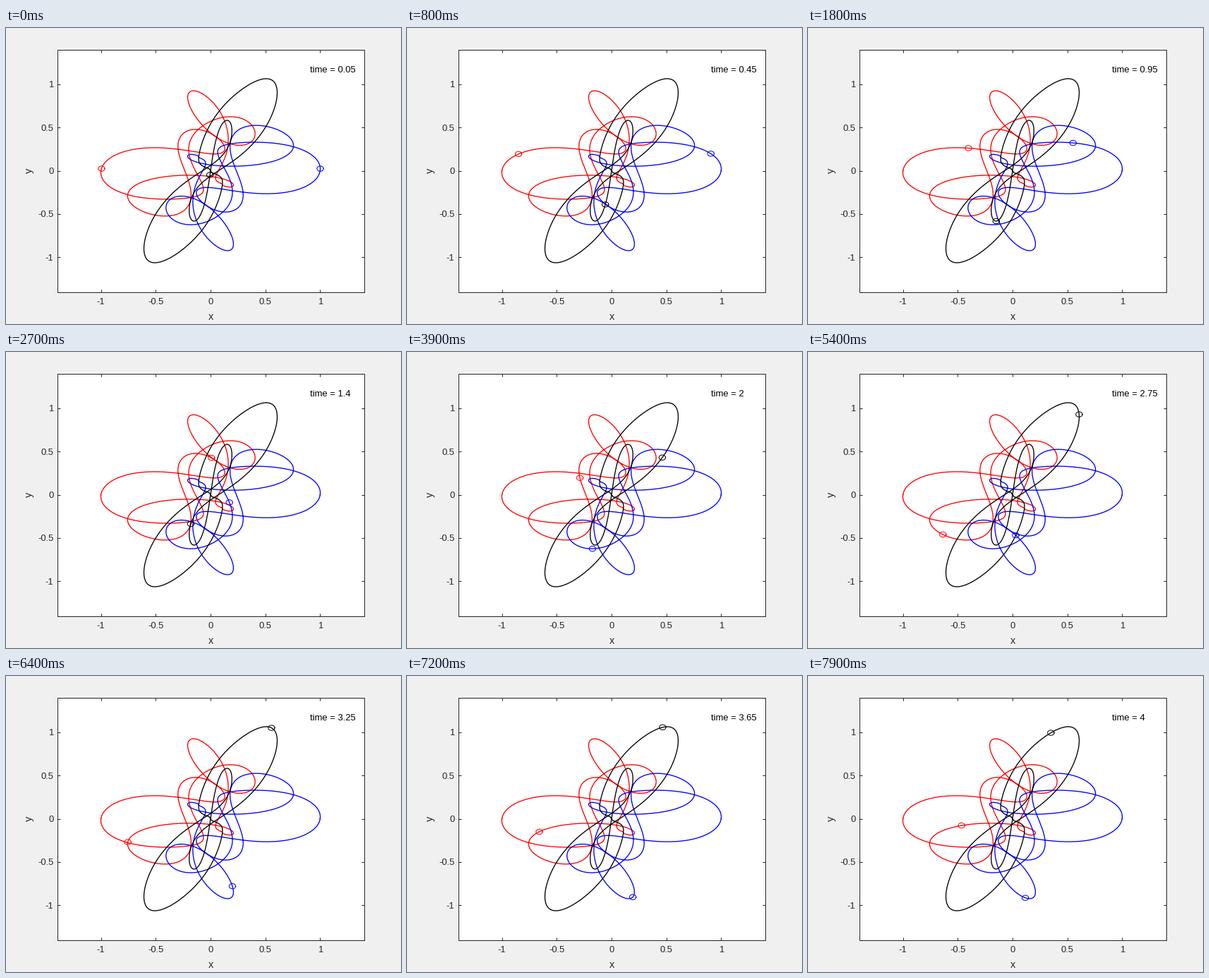
Animation of 560x420 px, one loop 8000 ms. Source, as a matplotlib script:

```python
import numpy as np
import matplotlib.pyplot as plt
from matplotlib.animation import FuncAnimation

W, H, DPI = 560, 420, 100
PX = 72 / DPI                       # one pixel in points
FRAMES, DT = 80, 0.05
COLORS = ["red", "blue", "black"]
INK = "#262626"
RADIUS = 0.03

# Sightings of the red and the black body that pick out this orbit.
TIMES = np.array([0.45, 1.4, 2, 2.75, 3.25, 4])
SEEN = np.array([
    [-0.847 + 0.191j, -0.058 - 0.386j],
    [0.026 + 0.423j, -0.187 - 0.330j],
    [-0.267 + 0.188j, 0.480 + 0.423j],
    [-0.638 - 0.464j, 0.625 + 0.919j],
    [-0.747 - 0.264j, 0.570 + 1.042j],
    [-0.435 - 0.077j, 0.361 + 0.993j],
])


def accel(p):
    """Gravity among three unit masses; positions are complex, shape (3, n)."""
    side = p[[1, 2, 0]] - p
    pull = side / np.abs(side) ** 3
    return pull - pull[[2, 0, 1]]


def fly(v, span, steps):
    """Integrate from (-1, 1, 0) with velocities (v, v, -2v), many v at once."""
    v = np.atleast_1d(v)
    one = np.ones_like(v)
    p, q = np.array([-one, one, 0 * one]), np.array([v, v, -2 * v])
    dt = span / steps
    ps, qs = [p], [q]
    for _ in range(steps):
        k1 = accel(p)
        k2 = accel(p + dt / 2 * q + dt ** 2 / 8 * k1)
        k3 = accel(p + dt * q + dt ** 2 / 2 * k2)
        p = p + dt * q + dt ** 2 / 6 * (k1 + 2 * k2)
        q = q + dt / 6 * (k1 + 4 * k2 + k3)
        ps.append(p)
        qs.append(q)
    return np.array(ps), np.array(qs)


def split(z):
    z = z.reshape(-1, z.shape[-1])
    return np.vstack([z.real, z.imag])


def misfit(u):
    p, _ = fly(u[0] + 1j * u[1], 4.0, 800)
    look = np.rint(TIMES * 200).astype(int)
    return split(p[look][:, ::2] - SEEN[..., None])


def gap(u):
    """Half a period on, black is back at the centre and red and blue move alike."""
    p, q = fly(u[0] + 1j * u[1], u[2], 1500)
    return split(np.array([p[-1, 2], 0.3 * (q[-1, 0] - q[-1, 1])]))


def refine(resid, u, rounds, eps=1e-6):
    """Gauss-Newton with a line search."""
    scales = 0.5 ** np.arange(8)
    for _ in range(rounds):
        r = resid(u[:, None] + eps * np.c_[np.zeros(len(u)), np.eye(len(u))])
        jac = (r[:, 1:] - r[:, :1]) / eps
        step = np.linalg.lstsq(jac, -r[:, 0], rcond=None)[0]
        tries = u[:, None] + step[:, None] * scales
        errs = np.linalg.norm(resid(tries), axis=0)
        best = np.nanargmin(errs)
        if not errs[best] < np.linalg.norm(r[:, 0]):
            break
        u = tries[:, best]
        if errs[best] < 1e-9:
            break
    return u


def solve():
    vx, vy = np.meshgrid(np.linspace(0.04, 0.09, 21), np.linspace(0.44, 0.50, 21))
    grid = np.array([vx.ravel(), vy.ravel()])
    start = grid[:, np.nanargmin(np.linalg.norm(misfit(grid), axis=0))]
    vel = refine(misfit, start, 8)

    p, q = fly(vel[0] + 1j * vel[1], 6.2, 3100)
    miss = np.abs(p[:, 2, 0]) + 0.2 * np.abs(q[:, 0, 0] - q[:, 1, 0])
    half = (2200 + np.argmin(miss[2200:])) / 500
    return refine(gap, np.append(vel, half), 10)


vx, vy, half = solve()
path = fly(vx + 1j * vy, half, 2000)[0][:, :, 0]
clock = np.linspace(0, half, len(path))

# The second half mirrors the first, with red and blue swapped.
loops = np.vstack([path, -path[::-1][:, [1, 0, 2]]])

plt.rcParams["font.family"] = "Liberation Sans"
fig = plt.figure(figsize=(W / DPI, H / DPI), dpi=DPI, facecolor="#f0f0f0")
ax = fig.add_axes([72.5 / W, 45.5 / H, 435 / W, 344 / H], facecolor="white")
ax.set(xlim=(-1.4, 1.4), ylim=(-1.4, 1.4))
ticks = [-1, -0.5, 0, 0.5, 1]
names = [f"{t:g}" for t in ticks]
ax.set_xticks(ticks, names)
ax.set_yticks(ticks, names)
ax.tick_params(direction="in", top=True, right=True, length=4.4 * PX,
               width=PX, color=INK, labelcolor=INK, labelsize=13 * PX)
ax.tick_params(axis="x", pad=8.5 * PX)
ax.tick_params(axis="y", pad=5 * PX)
for spine in ax.spines.values():
    spine.set(linewidth=PX, edgecolor=INK)


def write(x, y, text, size, **kw):
    return fig.text(x / W, 1 - y / H, text, fontsize=size * PX,
                    va="baseline", rotation_mode="anchor", **kw)


write(290, 413.5, "x", 14.5, ha="center", color=INK)
write(36.5, 202.5, "y", 14.5, ha="center", color=INK, rotation=90)
label = write(431, 63, "", 13, ha="left", color="black")

for z, c in zip(loops.T, COLORS):
    ax.plot(z.real, z.imag, color=c, lw=1.33 * PX)
rings = [ax.plot([], [], color=c, lw=PX)[0] for c in COLORS]
ring = RADIUS * np.exp(1j * np.linspace(0, 2 * np.pi, 41))


def draw(k):
    t = DT * (k + 1)
    for line, z in zip(rings, path.T):
        spot = np.interp(t, clock, z) + ring
        line.set_data(spot.real, spot.imag)
    label.set_text(f"time = {t:.4g}")
    return [*rings, label]


anim = FuncAnimation(fig, draw, frames=FRAMES, interval=100,
                     repeat=True, repeat_delay=0)
plt.show()
```
